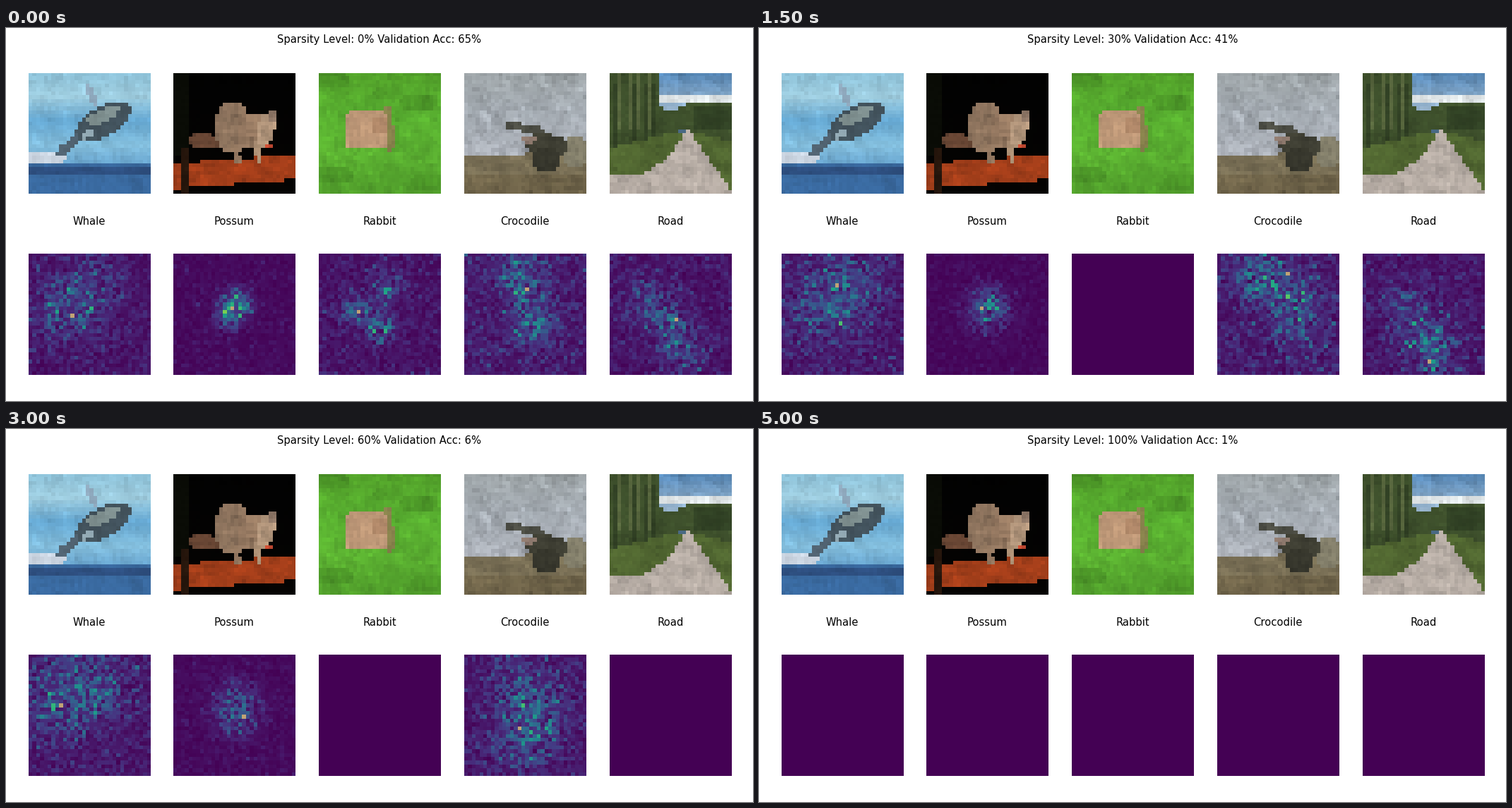
Recreate the animation shown at these times as a matplotlib script. Size 1058x529 px, loop 5.5 s.

```python
import numpy as np
import matplotlib.pyplot as plt
from matplotlib.animation import FuncAnimation

W, H, N = 1058, 529, 32
SIDE, STEP, LEFT = 171.9, 205.74, 31.7
PHOTO_TOP, HEAT_TOP = 63.55, 319.9
TITLE_Y, LABEL_Y = 21, 279          # text baselines
Y, X = np.mgrid[0:N, 0:N] + 0.5     # cell centres


# ---------- masks and paint ----------
def blob(cx, cy, rx, ry, tilt=0, power=2):
    a = np.radians(tilt)
    u = (X - cx) * np.cos(a) + (Y - cy) * np.sin(a)
    v = (Y - cy) * np.cos(a) - (X - cx) * np.sin(a)
    return np.abs(u / rx) ** power + np.abs(v / ry) ** power < 1


def limb(x0, y0, x1, y1, r):
    dx, dy = x1 - x0, y1 - y0
    t = np.clip(((X - x0) * dx + (Y - y0) * dy) / (dx * dx + dy * dy), 0, 1)
    return np.hypot(X - x0 - t * dx, Y - y0 - t * dy) < r


def gradient(*colours):
    """Evenly spaced colours from top to bottom."""
    rows = np.linspace(0, N, len(colours))
    return np.stack([np.interp(Y, rows, c) for c in np.transpose(colours)], -1)


def paint(img, mask, colour, mix=1.0):
    img[mask] = img[mask] * (1 - mix) + np.array(colour) * mix


def grain(img, seed, amount):
    rng = np.random.default_rng(seed)
    fine = rng.normal(0, 1, (N, N))
    soft = sum(np.roll(fine, (i, j), (0, 1)) for i in range(3) for j in range(3)) / 3
    return np.clip(img * (1 + amount * (0.4 * fine + 0.6 * soft))[..., None], 0, 255) / 255


# ---------- photos ----------
def whale():
    img = gradient((142, 195, 218), (158, 204, 222), (100, 166, 208),
                   (132, 190, 220), (98, 160, 205), (52, 100, 155))
    paint(img, Y > 24, (58, 106, 160))
    paint(img, (Y > 25) & (Y < 27), (44, 74, 122), 0.8)
    paint(img, blob(4, 22.6, 6, 1.8), (200, 210, 222))
    paint(img, limb(15.5, 4, 17.5, 8, 0.8), (140, 165, 185))
    paint(img, limb(13, 17, 8.6, 21.2, 1.3), (80, 98, 112))
    paint(img, blob(19.6, 12.8, 8, 3.9, -30), (66, 82, 92))
    paint(img, blob(19.5, 11.4, 4.5, 1.7, -25), (128, 145, 145))
    paint(img, blob(15.5, 16.2, 2, 1.1, -30), (140, 162, 172))
    return grain(img, 3, 0.04)


def possum():
    img = gradient((2, 2, 2), (5, 4, 3))
    paint(img, (X < 4) & (Y < 22), (10, 12, 6))
    paint(img, (Y > 24 - 0.07 * X) & (Y < 30.8 - 0.08 * X), (162, 62, 26))
    paint(img, (X > 2) & (X < 4) & (Y > 20), (38, 22, 12))
    paint(img, limb(6, 18, 13, 18.5, 1.8), (104, 70, 52))
    paint(img, blob(15.5, 14.5, 5, 6.6), (142, 116, 94))
    paint(img, blob(20.5, 15.5, 4, 4.8), (146, 118, 95))
    paint(img, limb(15.5, 19, 17.3, 23.5, 0.9), (150, 122, 98))
    paint(img, limb(21.5, 19, 22.6, 22.8, 0.9), (165, 138, 112))
    paint(img, blob(24.2, 15.2, 2.3, 4.6, 8), (176, 148, 122))
    paint(img, limb(25.8, 10.8, 26, 12.5, 0.8), (150, 125, 108))
    paint(img, blob(25, 19.5, 1, 0.8), (190, 72, 48))
    return grain(img, 5, 0.07)


def rabbit():
    img = gradient((82, 160, 42), (88, 174, 48), (92, 178, 50), (82, 160, 44))
    for cx, cy in ((26, 8), (4, 27), (29, 29), (3, 2)):
        paint(img, blob(cx, cy, 5, 2.5), (70, 140, 36), 0.5)
    paint(img, limb(18, 10, 18.8, 19.5, 1.2), (138, 132, 78))
    paint(img, blob(12.4, 15.2, 5.8, 5.2, power=5), (190, 152, 120))
    paint(img, blob(16, 14, 2, 2.5), (176, 136, 105))
    return grain(img, 8, 0.05)


def crocodile():
    img = gradient((158, 165, 168), (163, 170, 177), (172, 177, 185), (172, 174, 172))
    paint(img, Y > 22 - 4 / (1 + np.exp(18 - X)), (122, 112, 86))
    paint(img, Y > 27, (98, 86, 60), 0.5)
    paint(img, blob(29, 21, 3.5, 4), (128, 124, 104))
    paint(img, limb(11.8, 13.8, 20, 15.6, 1), (76, 77, 68))
    paint(img, blob(21.5, 19.2, 6, 3, 8), (66, 66, 54))
    paint(img, blob(21.5, 23, 4, 3.2), (54, 54, 44))
    paint(img, blob(17, 17.8, 1.7, 1), (150, 128, 116))
    return grain(img, 11, 0.07)


def road():
    img = gradient((84, 134, 182), (165, 192, 215), (150, 168, 172), (90, 110, 60))
    paint(img, (Y > 6) & (Y < 8), (222, 228, 230))
    paint(img, (X < 13) | (Y > 8 + 2 * np.exp(-((X - 16) / 3) ** 2)), (62, 80, 44))
    paint(img, (X < 13) & (Y < 15) & (np.cos(2.4 * X) > 0.5), (102, 114, 72), 0.6)
    paint(img, (X < 14) & (Y > 3) & (np.cos(2.4 * X) < -0.6), (42, 56, 32), 0.6)
    paint(img, (X > 22) & (Y > 9) & (Y < 15), (44, 60, 34), 0.7)
    paint(img, Y > 15 + 0.25 * np.abs(X - 19.5), (82, 104, 50))
    depth = np.clip((Y - 15) / 17, 0, None)
    lane = (Y > 15) & (X > 19 - 22 * depth ** 2) & (X < 20.5 + 12 * depth)
    paint(img, lane | (Y > 26.5) & (X < 20), (184, 174, 166))
    paint(img, blob(19, 15.4, 1.3, 0.7), (72, 104, 130))
    return grain(img, 14, 0.06)


# ---------- saliency maps ----------
def heat(col, step):
    """Speckle around a few wandering foci, scaled so its maximum is the peak."""
    _, _, base, spread, last, foci = PANELS[col]
    if step > last:
        return np.full((N, N), 0.0)
    rng = np.random.default_rng([col, step])
    level = np.full((N, N), base + 0.02 * step)
    for x, y in foci:
        dx, dy = rng.normal(0, 0.6 + 0.2 * step, 2)
        s = spread + 0.25 * step
        level += rng.uniform(0.5, 1) * np.exp(
            -((X - x - dx) ** 2 + (Y - y - dy) ** 2) / (2 * s * s))
    value = level * rng.gamma(3, 1 / 3, (N, N))
    return value / value.max()


# name, photo, base level, focus spread, last live step, foci
PANELS = [
    ("Whale", whale, 0.45, 5, 6, [(17, 7), (14, 14), (6, 14)]),
    ("Possum", possum, 0.08, 2.3, 7, [(16, 13), (15.5, 16), (17, 13)]),
    ("Rabbit", rabbit, 0.2, 2.5, 1, [(10, 16), (18, 18), (18, 8)]),
    ("Crocodile", crocodile, 0.35, 3.5, 7, [(13, 6), (17, 12), (20, 20)]),
    ("Road", road, 0.35, 3.8, 3, [(11, 13), (16, 20), (20, 26)]),
]
ACCURACY = [65, 58, 50, 41, 31, 18, 6, 2, 1, 0, 1]
CMAP = plt.cm.viridis.with_extremes(over=(0.76, 0.64, 0.46))

# ---------- stage ----------
plt.rcParams["font.family"] = "DejaVu Sans"
fig = plt.figure(figsize=(12, 6), dpi=88.16667, facecolor="white")


def show(img, col, top):
    """Image on whole pixels; returns it with its centre."""
    x0, x1 = (round(LEFT + col * STEP + d) for d in (0, SIDE))
    y0, y1 = (round(top + d) for d in (0, SIDE))
    ax = fig.add_axes([x0 / W, 1 - y1 / H, (x1 - x0) / W, (y1 - y0) / H])
    ax.axis("off")
    im = ax.imshow(img, cmap=CMAP, vmin=0, vmax=1.25, aspect="auto",
                   interpolation="nearest")
    return im, (x0 + x1) / 2


def write(x, y, text):
    return fig.text(x / W, 1 - y / H, text, size=12, ha="center", va="baseline")


title = write(W / 2, TITLE_Y, "")
grids = []
for col, (name, photo, *_) in enumerate(PANELS):
    _, centre = show(photo(), col, PHOTO_TOP)
    write(centre, LABEL_Y, name)
    grids.append(show(heat(col, 0), col, HEAT_TOP)[0])


def update(step):
    title.set_text(f"Sparsity Level: {step * 10}% Validation Acc: {ACCURACY[step]}%")
    for col, grid in enumerate(grids):
        value = heat(col, step)
        grid.set_data(np.where(value == 1, 2, value))
    return [title, *grids]


anim = FuncAnimation(fig, update, frames=len(ACCURACY), interval=500, repeat=True,
                     repeat_delay=0, blit=False)
plt.show()
```
